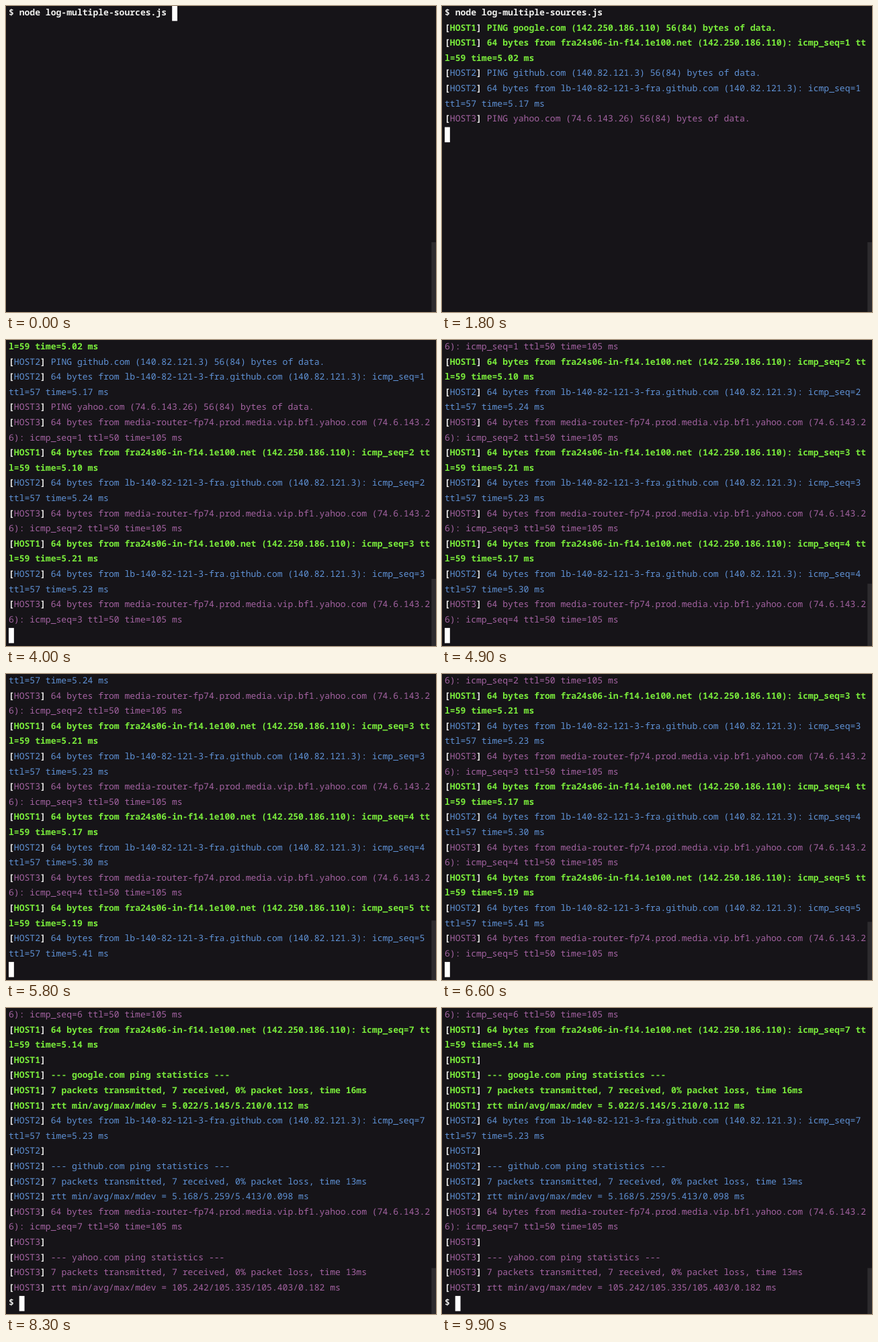
Recreate the animation shown at these times as an HTML page with a canvas. Size 640 by 456 pixels, loop 10 s.

```html
<!DOCTYPE html>
<html lang="en">
<head>
<meta charset="utf-8">
<title>Ping log</title>
<style>
html, body { margin: 0; width: 100%; height: 100%; overflow: hidden; background: #161418; }
canvas { display: block; }
</style>
</head>
<body>
<canvas id="stage" width="640" height="456"></canvas>
<script>
const ctx = document.getElementById('stage').getContext('2d');
const LOOP = 10000, COLS = 80, ROWS = 20;
const LEFT = 4, CELL = 7.845, LINE = 22.6, BASELINE = 14;
const WHITE = '#f0f0ee';
const FAMILY = '"Noto Sans Mono", monospace';

const hosts = [
  { tag: 'HOST1', color: '#79ea3b', bold: true, site: 'google.com', ip: '142.250.186.110',
    node: 'fra24s06-in-f14.1e100.net', ttl: 59, total: 16, rtt: '5.022/5.145/5.210/0.112',
    times: ['5.02', '5.10', '5.21', '5.17', '5.19', '5.19', '5.14'],
    ping: 1600, reply: k => k < 3 ? 600 + 1000 * k : 700 + 1000 * k },
  { tag: 'HOST2', color: '#5f92d6', bold: false, site: 'github.com', ip: '140.82.121.3',
    node: 'lb-140-82-121-3-fra.github.com', ttl: 57, total: 13, rtt: '5.168/5.259/5.413/0.098',
    times: ['5.17', '5.24', '5.23', '5.30', '5.41', '5.24', '5.23'],
    ping: 1600, reply: k => k < 3 ? 600 + 1000 * k : 700 + 1000 * k },
  { tag: 'HOST3', color: '#a463a2', bold: false, site: 'yahoo.com', ip: '74.6.143.26',
    node: 'media-router-fp74.prod.media.vip.bf1.yahoo.com', ttl: 50, total: 13,
    rtt: '105.242/105.335/105.403/0.182',
    times: Array(7).fill('105'),
    ping: 1800, reply: k => 900 + 1000 * k }
];

// Every terminal row: when it appears and its coloured runs.
const rows = [];

function log(at, host, text) {
  const line = `[${host.tag}] ${text}`;
  for (let start = 0; start < line.length; start += COLS) {
    const part = line.slice(start, start + COLS);
    const body = { color: host.color, bold: host.bold };
    const runs = start ? [{ col: 0, text: part, ...body }] : [
      { col: 0, text: '[', color: WHITE, bold: true },
      { col: 1, text: host.tag, ...body },
      { col: 6, text: ']', color: WHITE, bold: true },
      { col: 8, text: part.slice(8), ...body }
    ];
    rows.push({ at, runs });
  }
}

function prompt(at, text) {
  rows.push({ at, runs: [{ col: 0, text, color: WHITE, bold: true }] });
}

prompt(0, '$ node log-multiple-sources.js');
for (let k = 1; k <= 7; k++) {
  for (const h of hosts) {
    const at = h.reply(k);
    if (k === 1) log(h.ping, h, `PING ${h.site} (${h.ip}) 56(84) bytes of data.`);
    log(at, h, `64 bytes from ${h.node} (${h.ip}): icmp_seq=${k} ttl=${h.ttl} time=${h.times[k - 1]} ms`);
    if (k === 7) {
      log(at, h, '');
      log(at, h, `--- ${h.site} ping statistics ---`);
      log(at, h, `7 packets transmitted, 7 received, 0% packet loss, time ${h.total}ms`);
      log(at, h, `rtt min/avg/max/mdev = ${h.rtt} ms`);
    }
  }
}
const END = 7900;
prompt(END, '$');

// Pick the font size whose advance equals one terminal cell.
ctx.textRendering = 'geometricPrecision';
ctx.font = `100px ${FAMILY}`;
const size = 100 * CELL / ctx.measureText('0').width;

function cursorCell(t, count) {
  if (t < 1300) return [31, 0];
  return t < END ? [0, count] : [2, count - 1];
}

function draw(t) {
  ctx.fillStyle = '#161418';
  ctx.fillRect(0, 0, 640, 456);

  const shown = rows.filter(row => row.at <= t);
  const [col, row] = cursorCell(t, shown.length);
  const scroll = Math.max(0, row - ROWS + 1);

  shown.slice(scroll).forEach((line, i) => {
    for (const run of line.runs) {
      ctx.font = `${run.bold ? 600 : 400} ${size}px ${FAMILY}`;
      ctx.fillStyle = run.color;
      ctx.fillText(run.text, LEFT + run.col * CELL, i * LINE + BASELINE);
    }
  });

  ctx.fillStyle = '#ffffff';
  ctx.fillRect(LEFT + col * CELL, (row - scroll) * LINE - 0.3, CELL, LINE);

  const thumb = 104 * 75 / (75 + scroll);
  ctx.fillStyle = '#2d2b2e';
  ctx.fillRect(633.3, 456 - thumb, 6.7, thumb);
}

const begin = performance.now();
function tick() {
  draw((performance.now() - begin) % LOOP);
  requestAnimationFrame(tick);
}
tick();
</script>
</body>
</html>
```
